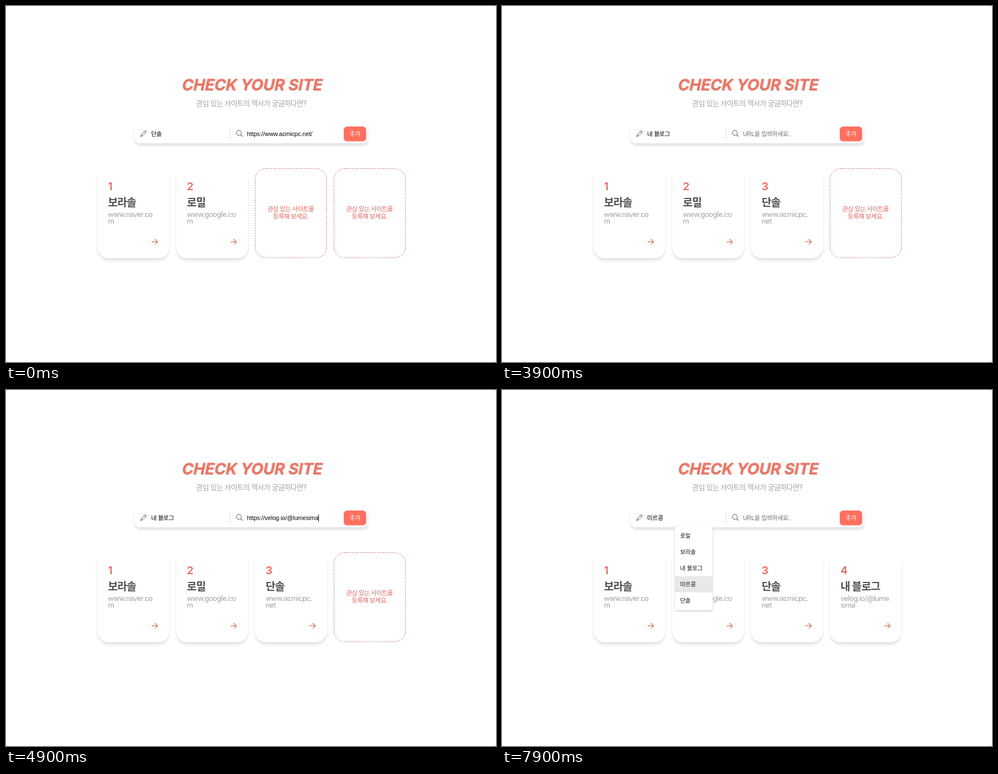
These frames come from a looping animation (878x638 px, 8000 ms). An HTML page:

```html
<!DOCTYPE html>
<html lang="ko">
<head>
<meta charset="utf-8">
<title>Check your site</title>
<style>
  html, body { margin: 0; width: 100%; height: 100%; overflow: hidden; background: #777; }
  #stage { position: relative; width: 878px; height: 638px; background: #fff; border-radius: 2px; }
  .box { position: absolute; background: #fff; border-radius: 20px;
    box-shadow: 0 3px 4px rgba(0,0,0,.08), 0 6px 4px rgba(0,0,0,.045); }
  .bar { left: 230.5px; top: 212px; width: 418px; height: 34px; border-radius: 8px; }
  svg { position: absolute; left: 0; top: 0; }
  text { font-family: Inter, "Noto Sans CJK KR", "Noto Sans CJK", sans-serif; letter-spacing: -.044em; }
  .mid { text-anchor: middle; }
  .title { font-size: 28px; font-weight: 700; letter-spacing: -.006em; fill: #f07361;
    filter: drop-shadow(1px 1px .5px rgba(0,0,0,.28)); }
  .sub { font-size: 12.8px; fill: #a0a0a0; }
  .field { font: 10.67px "Liberation Sans", "Noto Sans CJK KR", "Noto Sans CJK", sans-serif;
    letter-spacing: 0; fill: #000; }
  .ko { letter-spacing: -.018em; }
  .hint { fill: #6c6c6c; }
  .add { font-size: 10.67px; font-weight: 500; fill: #fff; }
  .num { font-size: 19.2px; font-weight: 600; fill: #e16a59; }
  .name { font-size: 19.2px; font-weight: 700; fill: #505050; }
  .link { font-size: 12.8px; fill: #a0a0a0; letter-spacing: -.04em; }
  .empty { font-size: 11.2px; font-weight: 500; fill: #d9685a; }
  .item { font-size: 10.2px; letter-spacing: 0; fill: #111; }
  .line { fill: none; stroke-linecap: round; stroke-linejoin: round; }
</style>
</head>
<body>
<div id="stage"></div>
<script>
const LOOP = 8000;
const names = ['로밀', '보라솔', '내 블로그', '미르콩', '단솔'];
const urls = ['https://lumesima.github.io/TIL/', 'https://www.google.com/', 'https://www.naver.com/',
  'https://velog.io/@lumesima', 'https://www.youtube.com/', 'https://www.acmicpc.net/'];
const sites = [
  [names[1], 'www.naver.co', 'm'],
  [names[0], 'www.google.co', 'm'],
  [names[4], 'www.acmicpc.', 'net'],
  [names[2], 'velog.io/@lume', 'sima']
];
const menus = {
  name: { x: 309.5, w: 68, tip: 326, items: names },
  url: { x: 497.5, w: 183, tip: 514, items: urls }
};

// Each step changes part of the state from its time on.
const steps = [
  [0, { cards: 2, name: names[4], url: urls[5], menu: '', pick: -1, caret: 0, fade: 1 }],
  [1700, { cards: 3, name: '', url: '' }],
  [2500, { menu: 'name', caret: 259.5, fade: .5 }],
  [2600, { fade: 1 }],
  [3000, { pick: 0 }],
  [3100, { pick: 2, caret: 0 }],
  [3400, { name: names[2], fade: .5 }],
  [3500, { menu: '', pick: -1, caret: 299.5, fade: 1 }],
  [3900, { caret: 0 }],
  [4100, { menu: 'url', caret: 431 }],
  [4300, { pick: 1 }],
  [4400, { pick: 2 }],
  [4600, { pick: 3, caret: 0 }],
  [4900, { menu: '', pick: -1, url: urls[3], caret: 559.5 }],
  [5400, { caret: 0 }],
  [5800, { cards: 4, name: '', url: '' }],
  [7100, { menu: 'name', caret: 259.5, fade: .5 }],
  [7200, { fade: 1 }],
  [7400, { pick: 0 }],
  [7500, { caret: 0 }],
  [7600, { pick: 1 }],
  [7700, { pick: 2 }],
  [7900, { pick: 3 }]
];

const text = (x, y, cls, str) => `<text x="${x}" y="${y}" class="${cls}">${str}</text>`;
const line = (d, color, w = 1) => `<path class="line" d="${d}" stroke="${color}" stroke-width="${w}"/>`;
const rect = (x, y, w, h, r, fill, extra = '') =>
  `<rect x="${x}" y="${y}" width="${w}" height="${h}" rx="${r}" fill="${fill}" ${extra}/>`;
const slotX = i => 163.5 + i * 141.3;

const header =
  `<g transform="translate(439.2 151) skewX(-12)">${text(0, 0, 'title mid', 'CHECK YOUR SITE')}</g>` +
  text(439.5, 178.7, 'sub mid', '관심 있는 사이트의 역사가 궁금하다면?') +
  line('M241.3 233.8l.9-3.2 7-7q.8-.7 1.6 0l.7.7q.7.8 0 1.6l-7 7zM247.8 225l2.3 2.3M242.2 230.6l2.3 2.3', '#555', .9) +
  line('M401.5 221V237', '#ddd') +
  '<circle cx="417.2" cy="227.3" r="4.4" fill="none" stroke="#555"/>' +
  line('M420.4 230.6l3.1 3.1', '#555', 1.2) +
  rect(605.1, 216, 40.2, 26.6, 6, '#ff7060') +
  text(625.2, 233, 'add mid', '추가');

function field(x, value, hint) {
  const str = value || hint;
  const ko = /[가-힣]/.test(str) ? ' ko' : '';
  return text(x, 233, 'field' + ko + (value ? '' : ' hint'), str);
}

function card(i) {
  const x = slotX(i) + 19.2, [name, top, rest] = sites[i];
  return text(x, 330, 'num', i + 1) + text(x, 359, 'name', name) +
    text(x, 377.5, 'link', top) + text(x, 390.4, 'link', rest) +
    line(`M${x + 78.7} 422.6h10.2m-4.3-4.3l4.3 4.3-4.3 4.3`, '#e16a59', 1.3);
}

function emptyCard(i) {
  const x = slotX(i), mid = x + 64.1;
  return rect(x + .4, 291.5, 128, 159.5, 19, 'none', 'stroke="#c4807a" stroke-dasharray="2.6 1.9"') +
    text(mid, 368, 'empty mid', '관심 있는 사이트를') +
    text(mid, 381.4, 'empty mid', '등록해 보세요.');
}

function menu({ x, w, tip, items }, pick, fade) {
  const rows = items.map((str, i) => {
    const y = 247 + i * 28.9;
    return (i === pick ? rect(x, y, w, 28.9, 0, '#e8e8e8') : '') + text(x + 9.7, y + 18, 'item', str);
  }).join('');
  return `<g opacity="${fade}"><g style="filter:drop-shadow(0 1px 1.2px rgba(0,0,0,.28))">` +
    rect(x, 243.5, w, items.length * 28.9 + 7, 3.5, '#fff') +
    `<path d="M${tip - 8} 244l6.5-6q1.5-1.2 3 0l6.5 6z" fill="#fff"/></g>${rows}</g>`;
}

function render(s) {
  let boxes = '<div class="box bar"></div>', art = header;
  for (let i = 0; i < 4; i++) {
    if (i < s.cards) {
      boxes += `<div class="box" style="left:${slotX(i)}px;top:291px;width:129px;height:160.5px"></div>`;
      art += card(i);
    } else art += emptyCard(i);
  }
  const list = menus[s.menu];
  const shown = key => s.menu === key && s.pick >= 0 ? list.items[s.pick] : s[key];
  art += field(260, shown('name'), '별명을 입력하세요. (최대 5자)') + field(431.8, shown('url'), 'URL을 입력하세요.');
  if (s.caret) art += rect(s.caret, 223, 1, 13, 0, '#000');
  if (list) art += menu(list, s.pick, s.fade);
  document.getElementById('stage').innerHTML = `${boxes}<svg width="878" height="638">${art}</svg>`;
}

let last = 0;
function tick() {
  const t = performance.now() % LOOP;
  const past = steps.filter(([at]) => at <= t);
  if (past.length !== last) {
    last = past.length;
    render(Object.assign({}, ...past.map(step => step[1])));
  }
  requestAnimationFrame(tick);
}
tick();
</script>
</body>
</html>
```
